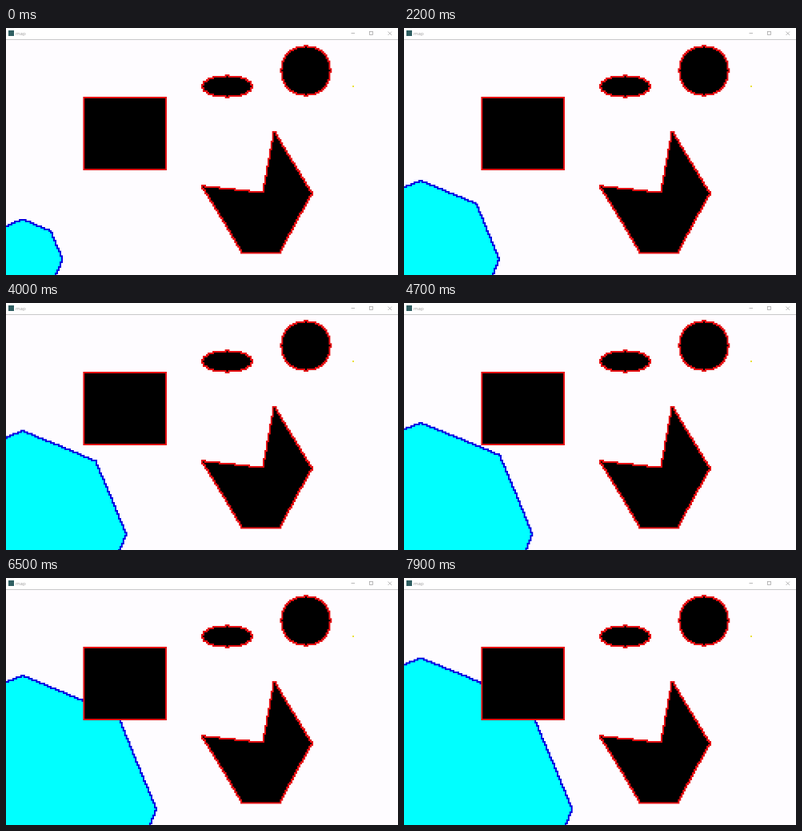
These frames come from a looping animation (490 px wide and 309 px high, 8000 ms). An HTML page with a canvas:

```html
<!DOCTYPE html>
<html lang="en">
<head>
<meta charset="utf-8">
<title>map</title>
<style>
  html, body { margin: 0; width: 100%; height: 100%; overflow: hidden; background: #fefcff; }
  svg, canvas { position: absolute; left: 0; display: block; }
  svg { top: 0; }
  canvas { top: 15px; width: 491.67px; height: 295px; }
  text { font: 6px "Open Sans", "Noto Sans", sans-serif; fill: #999; }
</style>
</head>
<body>
<canvas id="map"></canvas>
<svg width="490" height="15" viewBox="0 0 490 15">
  <rect width="490" height="14" fill="#fff"/>
  <rect y="14" width="490" height="1" fill="#c9c8ca"/>
  <rect x="3" y="3" width="7" height="7" fill="#2f5f62"/>
  <text x="12" y="9">map</text>
  <g fill="none" stroke="#a8a8a8" stroke-width=".8">
    <path d="M431.5 6.5h4.5M477.5 4.5l4.5 4.5m0-4.5l-4.5 4.5"/>
    <rect x="454.5" y="4.5" width="4" height="4"/>
  </g>
</svg>
<script>
const W = 250, H = 150, ZOOM = 4, STEP = 100, LOOP = 8000;
const START = [10, 10], GOAL = [220, 120];
const COLOR = {
  free: [254, 252, 255], seen: [0, 255, 255], edge: [0, 0, 225],
  wall: [0, 0, 0], margin: [229, 14, 18], goal: [235, 225, 60]
};
const POLY = [[125, 56], [150, 15], [173, 15], [193, 52], [170, 90], [163, 52]];

// step index, explored path cost
const GROWTH = [[0, 24.7], [9, 36.4], [22, 49.4], [33, 59.4], [47, 70.4], [65, 84.4], [79, 95.6]];

const inRect = (x, y) => x >= 50 && x <= 100 && y >= 67.5 && y <= 112.5;
const inEllipse = (x, y, cx, cy, a, b) => ((x - cx) / a) ** 2 + ((y - cy) / b) ** 2 <= 1;

function inPolygon(x, y) {
  let inside = false;
  for (let i = 0; i < POLY.length; i++) {
    const [ax, ay] = POLY[i], [bx, by] = POLY[(i + 1) % POLY.length];
    const cross = (bx - ax) * (y - ay) - (by - ay) * (x - ax);
    const along = (x - ax) * (x - bx) + (y - ay) * (y - by);
    if (cross === 0 && along <= 0) return true;
    if ((ay > y) !== (by > y) && x < ax + (y - ay) * (bx - ax) / (by - ay)) inside = !inside;
  }
  return inside;
}

const isWall = (x, y) => inRect(x, y) || inEllipse(x, y, 140, 120, 15, 6) ||
  inEllipse(x, y, 190, 130, 15, 15) || inPolygon(x, y);

// The margin is every cell that touches a wall, corners included.
const around = [-1, 0, 1];
const nearWall = (x, y) => around.some(i => around.some(j => isWall(x + i, y + j)));

// Each cell has a fixed colour, or a cost and the cost of its cheapest neighbour.
const cells = [];
for (let row = 0; row < H; row++) {
  for (let x = 0; x < W; x++) {
    const y = H - 1 - row;
    const dx = Math.abs(x - START[0]), dy = Math.abs(y - START[1]);
    const low = Math.min(dx, dy);
    const cost = Math.max(dx, dy) + (Math.SQRT2 - 1) * low;
    const fixed = isWall(x, y) ? COLOR.wall
      : nearWall(x, y) ? COLOR.margin
      : x === GOAL[0] && y === GOAL[1] ? COLOR.goal : null;
    cells.push({ fixed, cost, parent: cost - (low ? Math.SQRT2 : 1) });
  }
}

// The explored area grows evenly between the listed steps.
function reach(step) {
  let i = 0;
  while (i < GROWTH.length - 2 && step > GROWTH[i + 1][0]) i++;
  const [s0, r0] = GROWTH[i], [s1, r1] = GROWTH[i + 1];
  const k = (step - s0) / (s1 - s0);
  return Math.sqrt(r0 * r0 + (r1 * r1 - r0 * r0) * k);
}

const canvas = document.getElementById("map");
canvas.width = W * ZOOM;
canvas.height = H * ZOOM;
const view = canvas.getContext("2d");
view.imageSmoothingEnabled = false;
const grid = document.createElement("canvas");
grid.width = W;
grid.height = H;
const gridCtx = grid.getContext("2d");
const image = gridCtx.createImageData(W, H);

function draw(step) {
  const limit = reach(step);
  cells.forEach(({ fixed, cost, parent }, i) => {
    const color = fixed || (cost <= limit ? COLOR.seen : parent <= limit ? COLOR.edge : COLOR.free);
    image.data.set(color, i * 4);
    image.data[i * 4 + 3] = 255;
  });
  gridCtx.putImageData(image, 0, 0);
  view.drawImage(grid, 0, 0, canvas.width, canvas.height);
}

const began = performance.now();
let shown = -1;
function tick() {
  const step = Math.floor((performance.now() - began) % LOOP / STEP);
  if (step !== shown) draw(shown = step);
  requestAnimationFrame(tick);
}
tick();
</script>
</body>
</html>
```
